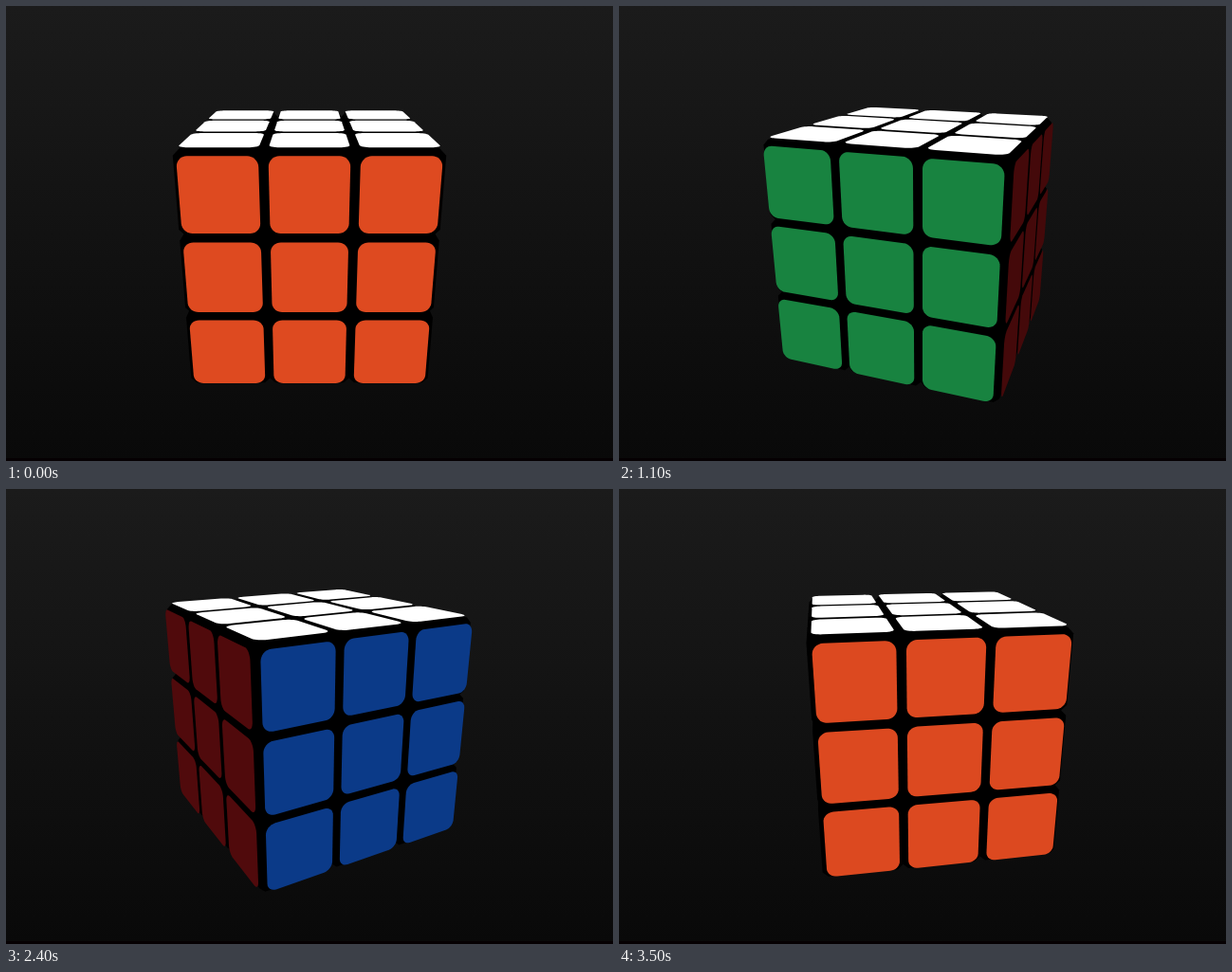
An HTML page with a canvas that plays this animation: 640 by 480 pixels, repeating every 3.6 s.

```html
<!DOCTYPE html>
<html>
<head>
<meta charset="utf-8">
<style>
html, body { margin: 0; width: 100%; height: 100%; overflow: hidden; background: #0a0a0a; }
canvas { display: block; }
</style>
</head>
<body>
<canvas id="stage" width="640" height="480"></canvas>
<script>
const ctx = document.getElementById('stage').getContext('2d');
const { sin, cos, PI } = Math;
const LOOP = 3600, STEP = 100;
const FOCAL = 600, DIST = 5.384, PITCH = PI / 9;
const HALF = 1 / 3, BEVEL = 0.045;          // cubie half size and chamfer
const STICKER = 0.297, RADIUS = 0.08;       // sticker half size and corner
const LIFT = 1.016;                         // sticker plane, just above the body
const SIDES = [[222, 74, 32], [25, 136, 67], [119, 15, 18], [12, 63, 149]];
const CELLS = [-2 / 3, 0, 2 / 3];
const SIGNS = [-1, 1];

// Turn a point about the vertical axis, then project it to the stage.
function project([x, y, z], turn) {
  const px = x * cos(turn) + z * sin(turn);
  const pz = z * cos(turn) - x * sin(turn);
  const scale = FOCAL / (DIST - y * sin(PITCH) - pz * cos(PITCH));
  return [320 + px * scale, 240 - (y * cos(PITCH) - pz * sin(PITCH)) * scale];
}

function halfHull(points) {
  const out = [];
  for (const p of points) {
    while (out.length > 1) {
      const [a, b] = out.slice(-2);
      if ((b[0] - a[0]) * (p[1] - a[1]) - (b[1] - a[1]) * (p[0] - a[0]) > 0) break;
      out.pop();
    }
    out.push(p);
  }
  return out.slice(0, -1);
}

function hull(points) {
  points.sort((a, b) => a[0] - b[0] || a[1] - b[1]);
  return [...halfHull(points), ...halfHull(points.slice().reverse())];
}

function fillPath(points, color) {
  ctx.fillStyle = color;
  ctx.beginPath();
  for (const [x, y] of points) ctx.lineTo(x, y);
  ctx.fill();
}

// Corners of a chamfered cube, relative to its centre.
const corners = [];
for (const a of SIGNS) for (const b of SIGNS) for (const c of SIGNS)
  for (let axis = 0; axis < 3; axis++)
    corners.push([a, b, c].map((s, i) => s * (i === axis ? HALF : HALF - BEVEL)));

// Outline of a rounded square, relative to its centre.
const outline = [];
for (let quarter = 0; quarter < 4; quarter++) {
  const mid = quarter * PI / 2 + PI / 4;
  const reach = (STICKER - RADIUS) * Math.SQRT2;
  for (let i = 0; i <= 8; i++) {
    const a = (quarter + i / 8) * PI / 2;
    outline.push([reach * cos(mid) + RADIUS * cos(a), reach * sin(mid) + RADIUS * sin(a)]);
  }
}

function drawFace(turn, color, place) {
  for (const u of CELLS) for (const v of CELLS)
    fillPath(outline.map(([x, y]) => project(place(u + x, v + y), turn)), color);
}

const backdrop = ctx.createLinearGradient(0, 0, 0, 480);
backdrop.addColorStop(0, '#1b1b1b');
backdrop.addColorStop(1, '#090909');

function draw(time) {
  const turn = -Math.floor(time % LOOP / STEP) * STEP / LOOP * 2 * PI;
  ctx.fillStyle = backdrop;
  ctx.fillRect(0, 0, 640, 480);
  ctx.fillStyle = '#050002';
  ctx.fillRect(0, 477, 640, 3);

  for (const x of CELLS) for (const y of CELLS) for (const z of CELLS)
    fillPath(hull(corners.map(c => project([x + c[0], y + c[1], z + c[2]], turn))), '#000');

  drawFace(turn, '#fff', (u, v) => [u, LIFT, v]);
  SIDES.forEach((rgb, i) => {
    const angle = turn + i * PI / 2;
    if (cos(angle) * DIST * cos(PITCH) <= LIFT) return;
    const light = 0.35 + 0.65 * cos(angle);
    drawFace(angle, `rgb(${rgb.map(c => Math.round(c * light))})`, (u, v) => [u, v, LIFT]);
  });
}

function tick() {
  draw(performance.now());
  requestAnimationFrame(tick);
}
tick();
</script>
</body>
</html>
```
